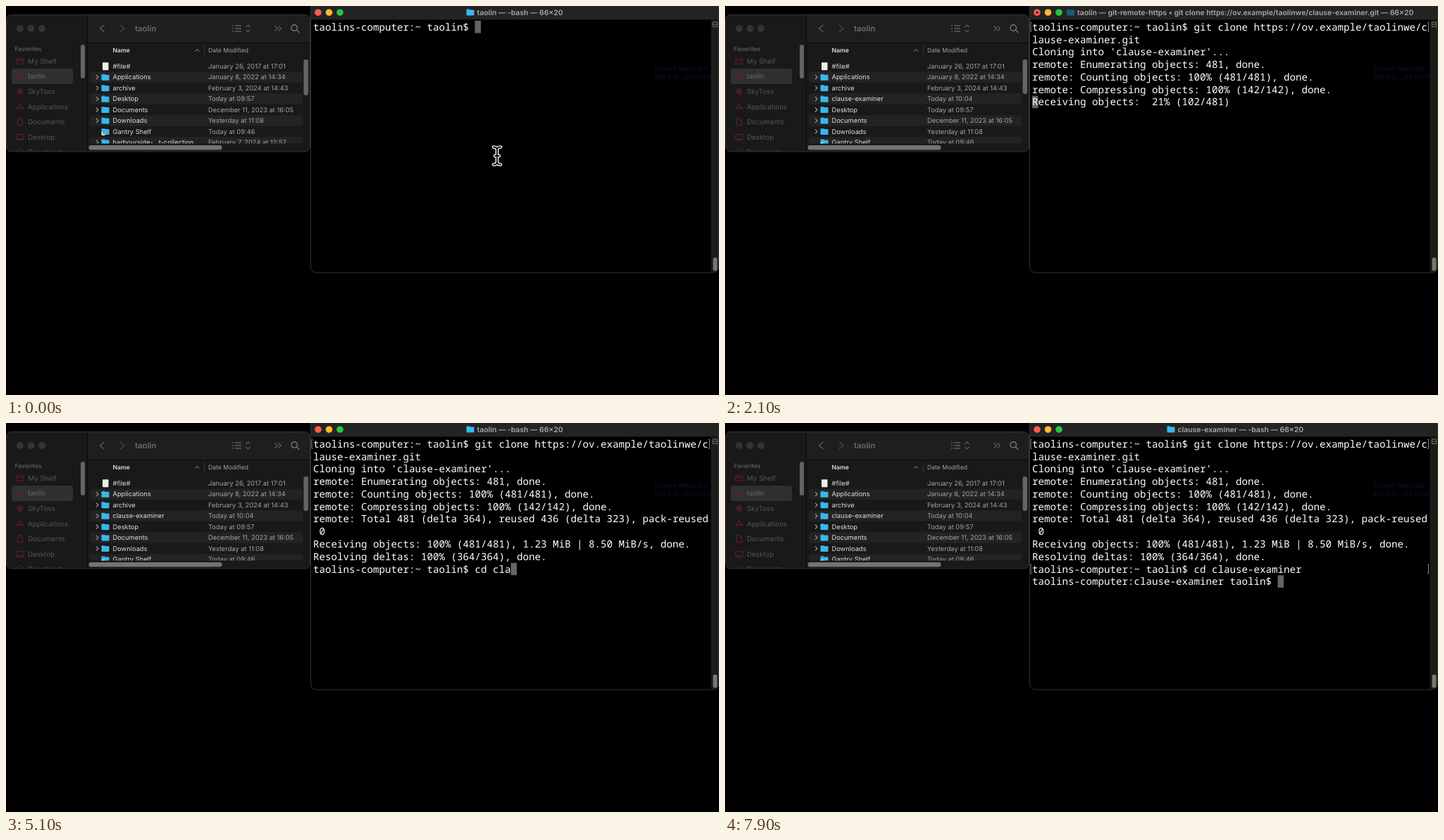
Animation, 1012 px wide and 553 px high, one loop 8000 ms. Source, as an HTML page with a canvas:

```html
<!DOCTYPE html>
<html lang="en">
<head>
<meta charset="utf-8">
<title>Cloning a repository</title>
<style>
  html, body { margin: 0; width: 100%; height: 100%; overflow: hidden; background: #000; }
  canvas { display: block; }
</style>
</head>
<body>
<canvas id="stage" width="1012" height="553"></canvas>
<script>
const ctx = document.getElementById('stage').getContext('2d');
const LOOP = 8000, STEP = 100;
const COLS = 66, CHAR_W = 8.5, ROW_H = 17.78, TERM_X = 436, TERM_Y = 29.8;
const UI = 'Inter, sans-serif', MONO = '"Noto Sans Mono", monospace';

const USER = 'taolin', PROJECT = 'clause-examiner';
const CLONE = `git clone https://ov.example/taolinwe/${PROJECT}.git`;
const CD = `cd ${PROJECT}`;
const PROMPT = `${USER}s-computer:~ ${USER}$ `;
const PASTE_AT = 900, ENTER_AT = 1800, CONNECT_AT = 2000, DONE_AT = 2300;
const TYPE_AT = 4030, KEY_MS = 178, CD_AT = 7400;

// Drawing helpers
function fill(x, y, w, h, color, radius = 0) {
  ctx.fillStyle = color;
  ctx.beginPath();
  ctx.roundRect(x, y, w, h, radius);
  ctx.fill();
}

function outline(x, y, w, h, color, radius = 0, width = 1) {
  ctx.strokeStyle = color;
  ctx.lineWidth = width;
  ctx.beginPath();
  ctx.roundRect(x, y, w, h, radius);
  ctx.stroke();
}

function disc(x, y, r, color) {
  ctx.fillStyle = color;
  ctx.beginPath();
  ctx.arc(x, y, r, 0, Math.PI * 2);
  ctx.fill();
}

function stroke(path, x, y, color, width = 1) {
  ctx.save();
  ctx.translate(x, y);
  ctx.strokeStyle = color;
  ctx.lineWidth = width;
  ctx.stroke(new Path2D(path));
  ctx.restore();
}

// y is the vertical middle of the capitals
function label(text, x, y, size, color, weight = 400) {
  ctx.font = `${weight} ${size}px ${UI}`;
  ctx.fillStyle = color;
  ctx.fillText(text, x, y + size * 0.36);
}

function clipped(x, y, w, h, draw) {
  ctx.save();
  ctx.beginPath();
  ctx.rect(x, y, w, h);
  ctx.clip();
  draw();
  ctx.restore();
}

function folder(x, y, dim) {
  fill(x - 5.5, y - 4.5, 5, 3, dim ? '#174c66' : '#229bd4', 1);
  fill(x - 5.5, y - 3.4, 11, 8, dim ? '#1d5c78' : '#39b7ec', 1);
}

// File browser
const FILES = [
  ['#file#', 'January 26, 2017 at 17:01', 'page'],
  ['Applications', 'January 8, 2022 at 14:34'],
  ['archive', 'February 3, 2024 at 14:43'],
  ['Desktop', 'Today at 09:57'],
  ['Documents', 'December 11, 2023 at 16:05'],
  ['Downloads', 'Yesterday at 11:08'],
  ['Gantry Shelf', 'Today at 09:46', 'alias'],
  ['harbourside-…t-collection', 'February 7, 2024 at 12:52'],
];
const CLONED = [PROJECT, 'Today at 10:04'];

const SIDEBAR = [
  ['My Shelf', 'M-5-3.5H5V4H-5ZM-5-1H5'],
  [USER, 'M-5 0L0-5L5 0M-3.5-1V4.5H3.5V-1M-1 4V1H1V4'],
  ['SkyToss', null],
  ['Applications', 'M-4.5 4L0-5L4.5 4M-5.5 1.5H5.5'],
  ['Documents', 'M-3.5-5H1L3.5-2V5H-3.5ZM1-5V-2H3.5'],
  ['Desktop', 'M-5-4H5V4H-5ZM-4 2.5H4'],
  ['Downloads', 'M-5 0A5 5 0 1 1 5 0A5 5 0 1 1-5 0'],
];

function drawSidebar() {
  label('Favorites', 12.5, 60.5, 8.5, '#5c5c58', 600);
  fill(8, 89, 87, 22, '#303030', 4);
  SIDEBAR.forEach(([name, icon], i) => {
    const y = 78.3 + i * 21.6;
    if (icon) stroke(icon, 20, y, '#651c38');
    else disc(20, y, 4.5, '#4d1a2c');
    label(name, 31, y, 9.8, i === 1 ? '#696966' : '#555552');
  });
  fill(106, 55, 6, 48, '#636363', 3);
}

function drawToolbar() {
  [20, 35.5, 51].forEach(x => disc(x, 32, 5, '#34342f'));
  stroke('M3-5L-3 0L3 5', 136.5, 32, '#5d5d5d', 1.4);
  stroke('M-3-5L3 0L-3 5', 165, 32, '#474747', 1.4);
  label(USER, 183, 32, 11.4, '#6c6c6a', 600);
  stroke('M-6-4H-4M-2-4H7M-6 0H-4M-2 0H7M-6 4H-4M-2 4H7', 327, 32, '#5d5d5d', 1.3);
  stroke('M-3-2L0-5L3-2M-3 2L0 5L3 2', 343.5, 32, '#5d5d5d', 1.2);
  stroke('M-4-3.5L0 0L-4 3.5M1-3.5L5 0L1 3.5', 385.5, 32, '#5d5d5d', 1.2);
  stroke('M3-1A4.3 4.3 0 1 1-5.6-1A4.3 4.3 0 1 1 3-1M2 2L6 6', 410.5, 32, '#737373', 1.4);
}

function drawFile([name, date, kind], i) {
  const y = 85.7 + i * 15.45;
  if (i % 2) fill(119, y - 7.7, 302, 15.4, '#232323', 3);
  if (kind === 'page') fill(137, y - 5.5, 8.5, 11, '#eeeee6', 1);
  else folder(141, y);
  if (kind === 'alias') {
    fill(135.5, y + 0.5, 5, 5, '#eee', 1);
    stroke('M-1.5 1.5L1.5-1.5M-.5-1.5H1.5V.5', 138, y + 3, '#222', 0.8);
  }
  if (!kind) stroke('M-1.5-3L1.5 0L-1.5 3', 129.5, y, '#a0a0a0', 1.1);
  label(name, 151.5, y, 9.3, '#dedede');
  label(date, 287, y, 9.3, '#a3a3a3');
}

function drawBrowser(t) {
  const cloned = t >= CONNECT_AT;
  const files = cloned ? [...FILES.slice(0, 3), CLONED, ...FILES.slice(3)] : FILES;
  fill(0.5, 12.5, 431, 194.5, '#191919', 7);
  fill(115, 13, 316, 39, '#1e1e1e', [0, 7, 0, 0]);
  clipped(1, 13, 114, 193.5, drawSidebar);
  drawToolbar();
  fill(115, 13, 1, 193, '#080808');
  fill(116, 52, 315, 1, '#0b0b0b');
  label('Name', 151.5, 63, 8.6, '#dedede', 600);
  stroke('M-3 1.5L0-1.5L3 1.5', 271.5, 63, '#999');
  fill(281, 56, 1, 14, '#353535');
  label('Date Modified', 287, 63, 8.6, '#a3a3a3');
  clipped(116, 74, 314, 121.5, () => files.slice(0, 8).forEach(drawFile));
  fill(422.5, 76, 6.5, cloned ? 49 : 51, '#646464', 3);
  fill(117.5, 198, 189, 6.5, '#737373', 3);
  outline(0.5, 12.5, 431, 194.5, '#35352b', 7);
}

// Terminal
const wrap = text => text.match(new RegExp(`.{1,${COLS}}`, 'g'));

function terminalState(t) {
  const lines = [], marks = [];
  let cursor = null;
  const add = text => lines.push(...wrap(text));
  const enter = text => { marks.push(lines.length); add(text); };

  if (t < ENTER_AT) {
    add(PROMPT + (t >= PASTE_AT ? CLONE : ''));
    return { lines, marks, cursor };
  }
  enter(PROMPT + CLONE);
  add(`Cloning into '${PROJECT}'...`);
  if (t < CONNECT_AT) {
    lines.push('');
    return { lines, marks, cursor };
  }
  add('remote: Enumerating objects: 481, done.');
  add('remote: Counting objects: 100% (481/481), done.');
  add('remote: Compressing objects: 100% (142/142), done.');
  if (t < DONE_AT) {
    const received = [0, 102, 347][(t - CONNECT_AT) / STEP];
    const percent = String(Math.floor(received / 4.81)).padStart(3);
    add(`Receiving objects: ${percent}% (${received}/481)`);
    cursor = 0;
    return { lines, marks, cursor };
  }
  add('remote: Total 481 (delta 364), reused 436 (delta 323), pack-reused 0');
  add('Receiving objects: 100% (481/481), 1.23 MiB | 8.50 MiB/s, done.');
  add('Resolving deltas: 100% (364/364), done.');
  if (t < CD_AT) {
    const typed = Math.max(0, Math.floor((t - TYPE_AT) / KEY_MS));
    add(PROMPT + CD.slice(0, typed));
  } else {
    enter(PROMPT + CD);
    add(`${USER}s-computer:${PROJECT} ${USER}$ `);
  }
  return { lines, marks, cursor };
}

function drawTitle(t) {
  const cloning = t >= CONNECT_AT && t < DONE_AT;
  let x = 668.5, text = `${USER} — -bash — 66×20`;
  if (cloning) {
    x = 500;
    text = `${USER} — git-remote-https • ${CLONE} — 66×20`;
  } else if (t >= CD_AT) {
    x = 642.5;
    text = `${PROJECT} — -bash — 66×20`;
  }
  folder(x - 9.5, 8.8, cloning);
  label(text, x, 9, 10.4, '#a9a9a7', 600);
  ['#ff5b52', '#fdbc2d', '#28c63f'].forEach((color, i) => disc(443 + i * 15.5, 9.2, 4.8, color));
  if (cloning) disc(443, 9.2, 1.6, '#5c0a06');
}

function drawText({ lines, marks, cursor }) {
  const row = lines.length - 1;
  const col = cursor ?? lines[row].length;
  fill(TERM_X + col * CHAR_W, TERM_Y + row * ROW_H - 8.8, CHAR_W, ROW_H - 0.3, '#646464');
  marks.forEach(r => {
    const y = TERM_Y + r * ROW_H;
    stroke('M1.5-6.5H0V6.5H1.5', 434, y, '#8c8c8c');
    stroke('M-1.5-6.5H0V6.5H-1.5', 998.5, y, '#8c8c8c');
  });
  ctx.font = `400 ${CHAR_W / 0.6}px ${MONO}`;
  ctx.fillStyle = '#fff';
  lines.forEach((line, r) => [...line].forEach((char, c) =>
    ctx.fillText(char, TERM_X + c * CHAR_W, TERM_Y + r * ROW_H + 5)));
}

function drawTerminal(t) {
  fill(432.5, -8, 579, 387, '#000', 8);
  fill(433, 0, 578, 19.5, '#232323');
  fill(1000.5, 20, 11, 358, '#1b1b1b', [0, 0, 7, 0]);
  label('Screen Recordin', 920, 89, 9.6, '#10102e');
  label('2024-0... 09.57.00', 920, 101, 9.3, '#10102e');
  outline(1003.5, 23, 6, 6.5, '#747474');
  stroke('M-2 0H2', 1006.5, 26.2, '#747474');
  fill(1003.5, 357.5, 6, 19, '#777', 3);
  outline(432.5, -8, 579, 387, '#35352b', 8);
  drawTitle(t);
  drawText(terminalState(t));
}

function drawPointer() {
  const beam = 'M-5-12.5Q0-12.5 0-8.5Q0-12.5 5-12.5M0-9V9M-5 12.5Q0 12.5 0 8.5Q0 12.5 5 12.5M-3 0H3';
  ctx.lineCap = 'round';
  stroke(beam, 697, 213, '#fff', 4.6);
  stroke(beam, 697, 213, '#000', 1.8);
  ctx.lineCap = 'butt';
}

function draw(now) {
  const t = Math.floor((now % LOOP) / STEP) * STEP;
  ctx.textRendering = 'geometricPrecision';
  fill(0, 0, 1012, 553, '#000');
  drawBrowser(t);
  drawTerminal(t);
  if (t < PASTE_AT) drawPointer();
  requestAnimationFrame(draw);
}
requestAnimationFrame(draw);
</script>
</body>
</html>
```
